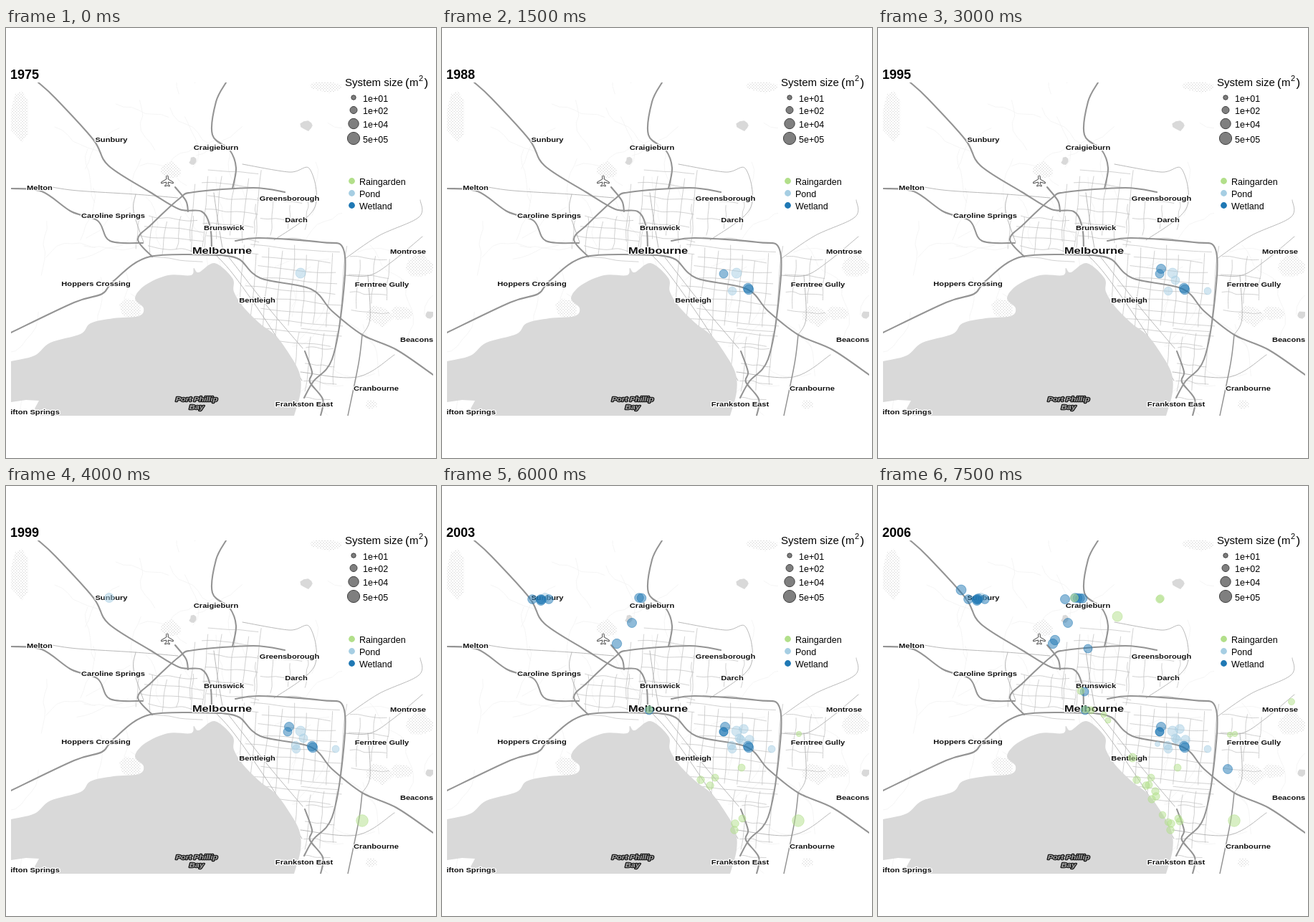
Recreate the animation shown at these times as an HTML page. Size 600x600 px, loop 8 s.

```html
<!DOCTYPE html>
<html lang="en">
<head>
<meta charset="utf-8">
<title>Stormwater systems around Melbourne</title>
<style>
html, body { margin: 0; width: 100%; height: 100%; overflow: hidden; background: #fff; }
svg { display: block; width: 600px; height: 600px; font-family: "Liberation Sans", Arial, sans-serif; }
.line { fill: none; stroke-linejoin: round; stroke-linecap: round; }
.place { font-weight: bold; fill: #111; stroke: #fff; stroke-width: 2.4; stroke-linejoin: round; paint-order: stroke; text-anchor: middle; }
.bay { font-style: italic; fill: #a8a8a8; stroke: #1c1c1c; }
</style>
</head>
<body>
<svg viewBox="0 0 600 600">
  <defs>
    <clipPath id="frame"><path d="M7 76H596V541H7Z"/></clipPath>
    <pattern id="hatch" width="4" height="4" patternUnits="userSpaceOnUse">
      <path d="M0 .5H2M2 2.5H4" stroke="#dcdcdc" stroke-width=".9"/>
    </pattern>
  </defs>
  <g clip-path="url(#frame)">
    <g id="parks" fill="url(#hatch)"></g>
    <g id="tracks" class="line" stroke="#f3f3f3" stroke-width=".8"></g>
    <g id="streets" class="line" stroke="#bebebe" stroke-width=".7"></g>
    <g id="arterials" class="line" stroke="#b0b0b0" stroke-width=".9"></g>
    <g id="water" fill="#d9d9d9"></g>
    <g id="highways" class="line" stroke="#949494" stroke-width="2.1"></g>
    <path d="M225 206c-1 0-1.3 1-1.3 2v3l-7 4v1.8l7-1.8v3l-2 1.6v1.2l3.3-1 3.3 1v-1.2l-2-1.6v-3l7 1.8v-1.8l-7-4v-3c0-1-.3-2-1.3-2z" fill="#fff" stroke="#444"/>
    <g id="places"></g>
  </g>
  <path d="M469 60H597V172H469ZM469 196H562V262H469Z" fill="#fff"/>
  <g id="systems"></g>
  <g id="legend" font-size="12.5"></g>
  <g font-size="15">
    <text x="473" y="81">System size</text>
    <text x="557" y="82" font-size="17">(</text>
    <text x="563" y="81">m</text>
    <text x="576" y="74" font-size="11">2</text>
    <text x="583.5" y="82" font-size="17">)</text>
  </g>
  <text id="year" x="6" y="71" font-size="18" font-weight="bold"></text>
</svg>
<script>
const STEP = 500, STRETCH = 1.266;
const years = [1975, 1980, 1985, 1988, 1990, 1993, 1995, 1998, 1999, 2000, 2001, 2002, 2003, 2004, 2005, 2006];
const colors = { Raingarden: '#b2df8a', Pond: '#a6cee3', Wetland: '#1f78b4' };
const byId = id => document.getElementById(id);

function add(parent, tag, attrs, text = '') {
  const el = document.createElementNS('http://www.w3.org/2000/svg', tag);
  for (const key in attrs) el.setAttribute(key, attrs[key]);
  el.textContent = text;
  return byId(parent).appendChild(el);
}
const path = (parent, d) => add(parent, 'path', { d });

let seed = 11;
const random = () => (seed = seed * 16807 % 2147483647) / 2147483647;
const jitter = size => (random() - .5) * size;

// Smooth line through a few key points, written "x,y x,y ..."
function curve(text) {
  const p = text.split(' ').map(pair => pair.split(',').map(Number));
  const at = i => p[Math.max(0, Math.min(i, p.length - 1))];
  const handle = (i, sign) => at(i).map((v, k) => v + sign * (at(i + 1)[k] - at(i - 1)[k]) / 6);
  return 'M' + p[0] + p.slice(1).map((end, i) => `C${handle(i, 1)} ${handle(i + 1, -1)} ${end}`).join('');
}

// Irregular outline around a centre
function blob(parent, x, y, rx, ry) {
  const corners = Array.from({ length: 9 }, (_, i) => {
    const angle = i * Math.PI * 2 / 9, size = 1 + jitter(.5);
    return [x + rx * size * Math.cos(angle), y + ry * size * Math.sin(angle)];
  });
  path(parent, `M${corners.join('L')}Z`);
}
blob('parks', 20, 125, 14, 38);
blob('parks', 448, 82, 24, 8);
blob('parks', 230, 198, 16, 11);
blob('parks', 175, 393, 15, 17);
blob('parks', 522, 402, 18, 14);
blob('parks', 577, 330, 18, 15);
blob('parks', 552, 398, 14, 9);
blob('parks', 510, 525, 8, 6);
blob('water', 420, 136, 10, 7);
blob('water', 261, 186, 5, 5);
blob('water', 591, 400, 6, 5);

// Bay, from the western shore round to the peninsula
path('water', curve('7,465 40,457 62,439 104,427 118,412 150,405 185,402 192,391 180,377 194,359 226,345 258,345 262,335 269,341 291,328 316,349 318,368 331,389 354,412 376,429 392,450 409,480 411,508 402,541')
  + 'H48L40 531 46 520 28 519 7 522Z');

// Faint country tracks
for (let i = 0; i < 60; i++) {
  let x = 7 + random() * 589, y = 76 + random() * 465, turn = random() * 6.3, d = `M${x} ${y}`;
  for (let j = 0; j < 7; j++) {
    turn += jitter(1);
    x += 11 * Math.cos(turn);
    y += 11 * Math.sin(turn);
    d += `L${x} ${y}`;
  }
  path('tracks', d);
}

// Suburban streets: skewed rows and columns that wander and break off
function grid(left, top, width, height, cols, rows, skew = .09) {
  const street = (from, place) => {
    const start = random() * .2, end = 1 - random() * .2, points = [];
    for (let i = 0; i <= 5; i++) points.push(place(start + (end - start) * i / 5, from + jitter(3)));
    path('streets', curve(points.join(' ')));
  };
  for (let i = 0; i <= cols; i++) street(left + width * i / cols, (t, x) => [x - height * t * skew, top + height * t]);
  for (let i = 0; i <= rows; i++) street(top + height * i / rows, (t, y) => [left + width * t, y + width * t * skew]);
}
grid(333, 302, 142, 130, 8, 9);
grid(265, 196, 92, 112, 5, 6);
grid(186, 262, 95, 56, 5, 4);
grid(408, 420, 55, 95, 3, 4);
grid(350, 238, 72, 52, 3, 2);
grid(474, 318, 62, 75, 3, 3);

[
  '64,222 100,227 180,232 240,237',
  '181,232 178,256 192,299',
  '330,190 395,201 424,197 430,252 374,296',
  '290,230 295,265 303,313',
  '578,240 576,264 520,290 473,322',
  '473,345 508,345 540,325 581,291',
  '497,428 508,405 505,345',
  '287,311 318,345 371,421 413,492',
  '311,320 365,389 414,447',
  '411,480 490,487 542,456'
].forEach(road => path('arterials', curve(road)));

[
  '45,76 69,98 122,156 143,192 201,229 242,253 273,256 285,278 287,310',
  '307,76 293,103 288,149 312,170 321,195 316,224',
  '7,224 50,228 91,256 128,269 145,297 191,300',
  '204,319 184,295 203,274 242,238 262,229 345,223 389,229',
  '236,222 251,241 254,256',
  '7,425 95,383 134,371 150,353 201,319 301,317',
  '301,317 326,323 355,349 425,364 455,395 497,428 545,449 596,484',
  '320,297 354,293 441,299 471,309 470,378 455,462 429,493 416,516',
  '417,451 427,480 424,494 442,518 439,541'
].forEach(road => path('highways', curve(road)));
path('highways', curve('497,428 492,468 477,541')).setAttribute('stroke-width', 1.5);

// The map is wider than its own projection, labels included
function place(name, x, y, size = 8.8, cls = 'place') {
  add('places', 'text', { class: cls, 'font-size': size, transform: `translate(${x} ${y}) scale(${STRETCH} 1)` }, name);
}
place('Sunbury', 147, 159);
place('Craigieburn', 293, 170);
place('Melton', 47, 226);
place('Caroline Springs', 149.5, 265);
place('Greensborough', 395.5, 240.5);
place('Darch', 405, 270.5);
place('Brunswick', 304, 282);
place('Melbourne', 301.5, 314.5, 13);
place('Hoppers Crossing', 125.5, 359.5);
place('Bentleigh', 350.5, 383);
place('Ferntree Gully', 524.5, 360.5);
place('Montrose', 561, 315);
place('Beaconsfield', 584.5, 438);
place('Cranbourne', 516.5, 505.5);
place('Frankston East', 416, 527.5);
place('Clifton Springs', 35, 539);
place('Port Phillip', 266, 520.5, 8.8, 'place bay');
place('Bay', 266, 531.5, 8.8, 'place bay');

// One dot for each arrival step, each moved on from the one before
const dots = [];
function trail(kind, steps, x, y, r = 6, dx = 0, dy = 0) {
  const color = colors[kind];
  steps.forEach((step, i) => {
    const el = add('systems', 'circle', { cx: x + dx * i, cy: y + dy * i, r, fill: color, stroke: color, opacity: 1, 'fill-opacity': .5, 'stroke-opacity': .5 });
    dots.push({ step, el });
  });
}
const pond = trail.bind(null, 'Pond');
pond([0], 411, 342, 7);
pond([1, 8], 405, 367, 5.8, -1, -5);
pond([4, 11], 415, 352, 6, 2, 2);
pond([5], 460, 367, 5);
pond([8], 144, 156, 6.5);
pond([9, 9], 421, 339, 6.3, 8, 15);
pond([15], 390, 360, 3.5);

const wetland = trail.bind(null, 'Wetland');
wetland([2, 9], 393, 343);
wetland([3, 3], 427, 363, 6.8, 1, 2);
wetland([6], 395, 336, 6.5);
wetland([9, 11, 11], 149, 158, 6.3, -11.5);
wetland([11, 12, 14], 138, 160, 6.5, 1, -1.5);
wetland([9, 9, 14, 14], 275, 156, 6.3, 3.5, .3);
wetland([10], 265, 191, 6.5);
wetland([10, 13], 244, 220, 6.7, 3, -5);
wetland([12, 15], 289, 313, 6, -1, -26);
wetland([13], 116, 145, 7);
wetland([13], 261, 158, 6.5);
wetland([14], 293, 227);
wetland([15], 488, 395, 6.5);

const raingarden = trail.bind(null, 'Raingarden');
raingarden([7], 497, 467, 8.3);
raingarden([9, 15], 498, 346, 3.7, -7, 1);
raingarden([10], 418, 393, 5);
raingarden([10], 381, 407, 5);
raingarden([10, 10, 14], 361, 410, 5.3, 13, 8);
raingarden([10, 15], 419, 464, 5, 2, 4);
raingarden([11, 12], 409, 471, 5.3, -1, 9);
raingarden([12, 15], 289, 312, 5, 8, 1);
raingarden([13, 15], 405, 469, 4.8, -8, -10);
raingarden([13], 334, 182, 7);
raingarden([13], 355, 379);
raingarden([13], 378, 417, 5);
raingarden([14, 15], 382, 437, 5.2, 6, -4);
raingarden([14, 14], 393, 158, 5.3, 1, -1);
raingarden([14], 283, 286, 5);
raingarden([14], 274, 156, 5.5);
raingarden([15, 15], 315, 319, 4, 6, 8);
raingarden([15], 577, 301, 4.5);

// Legend
[['1e+01', 97, 3.2], ['1e+02', 114.5, 5], ['1e+04', 133.5, 7.2], ['5e+05', 154, 8.6]].forEach(([label, cy, r]) => {
  add('legend', 'circle', { cx: 485, cy, r, fill: '#7f7f7f', stroke: '#404040' });
  add('legend', 'text', { x: 498, y: cy + 5.5 }, label);
});
Object.entries(colors).forEach(([label, fill], i) => {
  add('legend', 'circle', { cx: 482.5, cy: 213.5 + 17 * i, r: 4.4, fill });
  add('legend', 'text', { x: 493, y: 219 + 17 * i }, label);
});

let shown = -1;
function draw() {
  const step = Math.floor(performance.now() / STEP) % years.length;
  if (step !== shown) {
    shown = step;
    byId('year').textContent = years[step];
    for (const dot of dots) dot.el.style.display = dot.step <= step ? '' : 'none';
  }
  requestAnimationFrame(draw);
}
draw();
</script>
</body>
</html>
```
